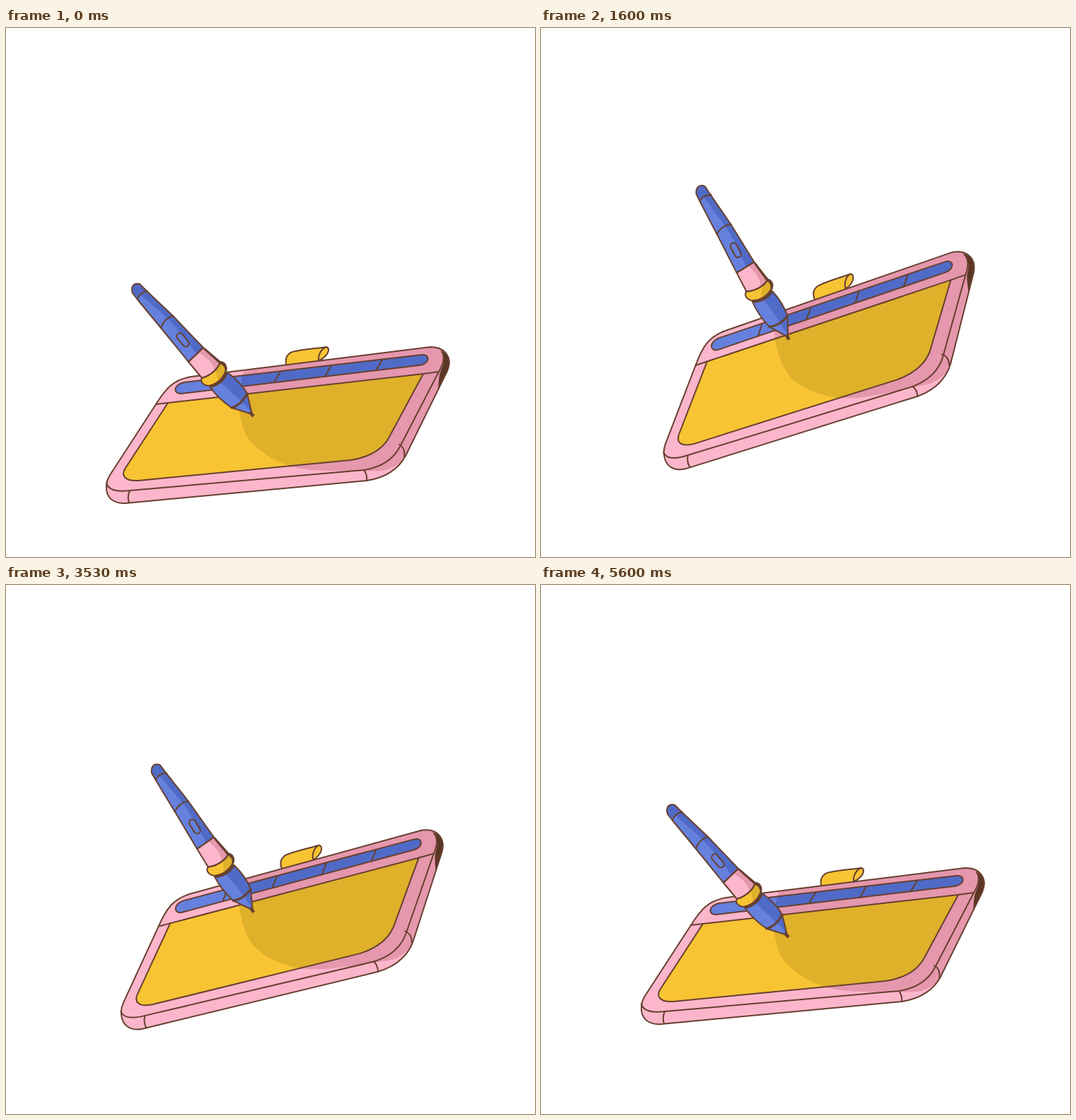
An HTML page for the animation above (5.63 s loop, 748 px wide and 748 px high).

```html
<!DOCTYPE html>
<html lang="en">
<head>
<meta charset="utf-8">
<title>Drawing tablet</title>
<style>
html, body { margin: 0; width: 100%; height: 100%; overflow: hidden; background: #fff; }
svg { display: block; width: 100%; height: 100%; }
.line { fill: none; stroke: #67402f; stroke-width: 2; stroke-linecap: round; stroke-linejoin: round; }
.medium { stroke-width: 3; }
.thick { stroke-width: 4.5; stroke-linecap: butt; }
.pink { fill: #fcb6cb; }
.pink-dark { fill: #e597ad; }
.gold { fill: #f8c433; }
.gold-dark { fill: #dfb02a; }
.blue { fill: #6580dd; }
.blue-dark { fill: #506ac7; }
.brown { fill: #5b3624; }
</style>
</head>
<body>
<svg viewBox="0 0 748 748">
  <defs>
    <path id="body" d="M142 648C141 662 150 673 169 672L510 640C538 636 556 622 565 605L624 485C631 468 623 451 600 451L262 493C238 497 227 508 212 532L147 632Q142 640 142 648Z"/>
    <path id="screen" d="M229 530L590 489L541 580C531 597 513 607 487 611L187 640C168 641 162 633 169 622Z"/>
    <path id="slot" d="M252 501L588 462C600 461 600 475 584 477L248 517C236 518 236 504 252 501Z"/>
    <path id="shade" d="M338 478C326 515 326 548 340 577C358 602 390 621 432 625C470 627 505 627 534 626Q550 622 570 606L660 500V440H345Z"/>
    <path id="barrel" d="M186 384L179 375C176 366 180 360 189 362L197 370L236 407L279 452L258 472L219 424Z"/>
    <path id="collar" d="M258 472L279 452L303 472C300 482 290 491 277 495Z"/>
    <path id="ring" d="M277 495C290 491 300 482 303 472C309 472 313 478 311 484C307 495 299 503 288 506C280 506 274 501 277 495Z"/>
    <path id="grip" d="M288 507C300 504 309 497 313 487Q332 501 341 517L348 546L319 537Q300 524 288 507Z"/>
    <clipPath id="in-body"><use href="#body"/></clipPath>
    <clipPath id="in-screen"><use href="#screen"/></clipPath>
    <clipPath id="in-slot"><use href="#slot"/></clipPath>
    <clipPath id="in-barrel"><use href="#barrel"/></clipPath>
    <clipPath id="in-collar"><use href="#collar"/></clipPath>
    <clipPath id="in-ring"><use href="#ring"/></clipPath>
    <clipPath id="in-grip"><use href="#grip"/></clipPath>
  </defs>

  <g id="tablet">
    <path class="gold" d="M396 476C394 465 400 458 409 457C423 454 440 453 453 451Q458 453 455 459Q451 466 444 468L442 473Z"/>
    <path class="line" d="M396 475C394 465 400 458 409 457C423 454 440 453 453 451C447 453 441 461 442 470C449 468 456 461 456 455Q456 452 453 451"/>

    <use href="#body" class="pink"/>
    <use href="#shade" class="pink-dark" clip-path="url(#in-body)"/>
    <use href="#screen" class="gold"/>
    <use href="#shade" class="gold-dark" clip-path="url(#in-screen)"/>
    <use href="#slot" class="blue"/>
    <use href="#shade" class="blue-dark" clip-path="url(#in-slot)"/>
    <path class="brown" d="M616 457C629 462 630 474 624 485L611 511C612 500 612 491 615 484C620 474 621 466 616 457Z"/>

    <g class="line">
      <use href="#body"/>
      <use href="#screen"/>
      <use href="#slot"/>
      <path d="M142 643C144 653 157 656 175 654L506 625C532 621 548 609 557 592L612 486C620 473 620 463 616 457"/>
      <path d="M175 654Q171 663 174 671M506 625Q511 631 510 640M556 589Q565 594 563 606"/>
      <path d="M212 532L229 530M590 489L612 486"/>
      <path d="M316 494L307 510M388 486L379 501M460 477L451 493M532 469L523 484"/>
    </g>
  </g>

  <g id="pen">
    <use href="#barrel" class="blue"/>
    <path class="blue-dark" clip-path="url(#in-barrel)" d="M176 358H200L282 450L270 462C252 437 236 417 222 405L189 376L184 381L176 372Z"/>
    <use href="#collar" class="pink"/>
    <path class="pink-dark" clip-path="url(#in-collar)" d="M272 458L279 450L305 473L295 486C293 471 283 467 272 458Z"/>
    <use href="#ring" class="gold"/>
    <path class="gold-dark" clip-path="url(#in-ring)" d="M297 483L304 470L315 480L300 504Z"/>
    <use href="#grip" class="blue"/>
    <path class="blue-dark" clip-path="url(#in-grip)" d="M302 500L314 486L345 515L350 548C342 536 325 520 302 500Z"/>
    <g class="line">
      <use href="#barrel"/>
      <use href="#collar"/>
      <use href="#ring"/>
      <use href="#grip"/>
      <path d="M186 383Q190 373 200 372M219 424Q224 410 236 407"/>
      <rect x="239" y="436.5" width="22" height="9" rx="4.5" transform="rotate(50 250 441)"/>
      <path class="medium" d="M281 454L302 473Q311 476 311 484M319 537Q333 533 341 517"/>
      <path class="thick" d="M288 507Q307 502 312 486M344.500 543L350 549"/>
    </g>
  </g>
</svg>

<script>
const LOOP = 5630, CYCLE = 47;
const FALL = 33, REST = -51;   // pose where the drop begins, height where it ends

const tablet = document.getElementById('tablet');
const pen = document.getElementById('pen');

const clamp = p => Math.min(1, Math.max(0, p));
const ease = p => 1 - (1 - clamp(p) ** 1.5) ** 3.4;
const swing = p => 14.5 * Math.sin(Math.PI * clamp(p)) ** 2;

// 25 poses a second, shown on a 30 Hz grid
const poseAt = t => Math.floor(Math.floor((t + 4) * 0.03) * 5 / 6) % CYCLE;

function draw(time) {
  const n = poseAt(time % LOOP);
  const drift = -217 - 2.05 * n;
  const up = drift * ease(n / 12);
  const lift = up + (REST - up) * ease((n - FALL) / 13);
  const angle = swing(n / 12) + swing((n - FALL) / 11);
  tablet.setAttribute('transform', `translate(0 ${lift}) rotate(${-angle} 410 521)`);
  pen.setAttribute('transform', `translate(0 ${lift}) rotate(${angle} 410 546)`);
}

const start = performance.now();
function tick() {
  draw(performance.now() - start);
  requestAnimationFrame(tick);
}
tick();
</script>
</body>
</html>
```
